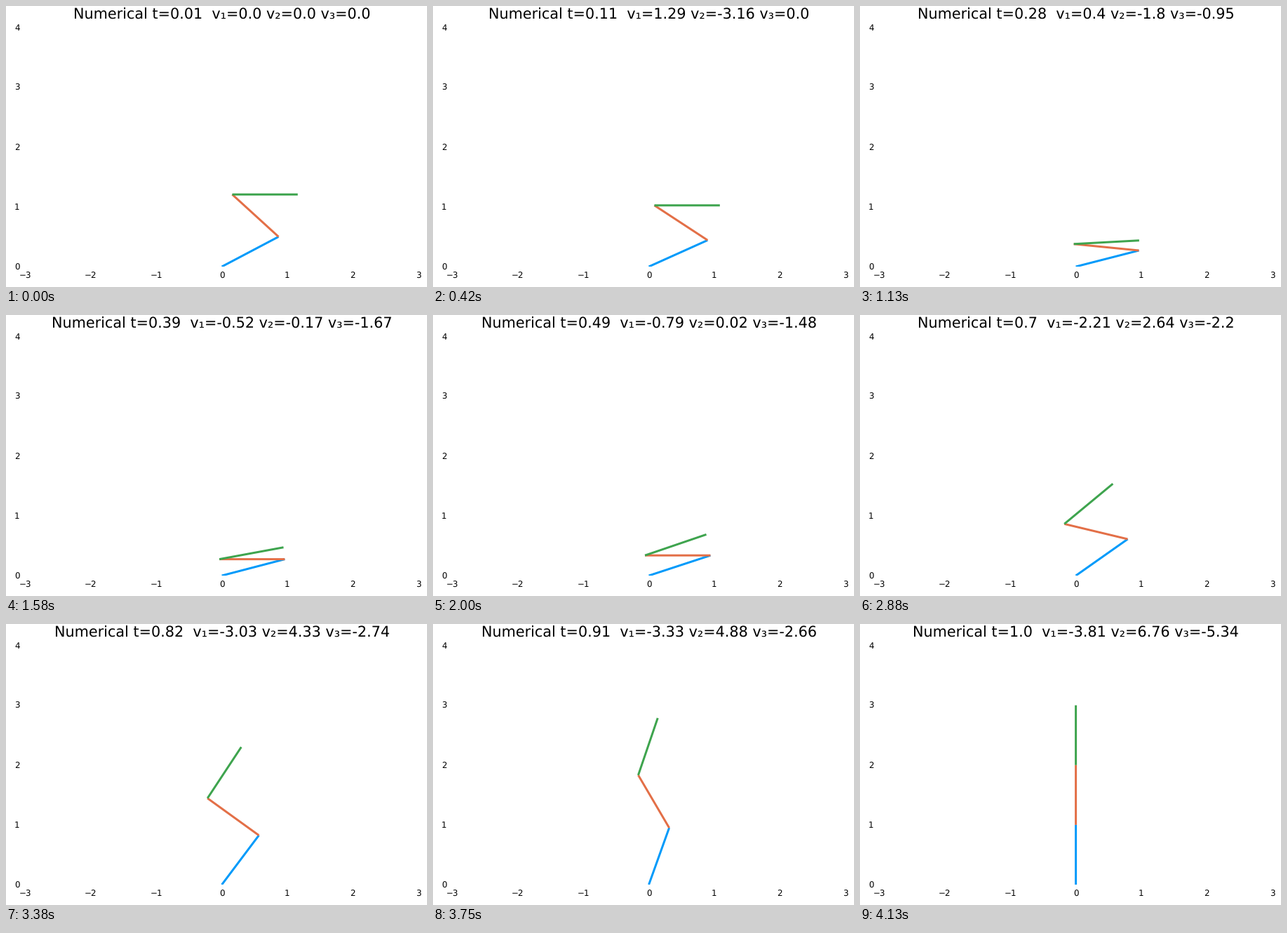
A matplotlib script for the animation above (4180 ms loop, 600 by 400 pixels).

```python
import numpy as np
import matplotlib.pyplot as plt
from matplotlib.animation import FuncAnimation

W, H, DPI = 600, 400, 100
X0, X1, Y0, Y1 = 27.6, 587.6, 371.0, 30.6     # plot area in pixels, y down
COLORS = ["#009afa", "#e36f47", "#3ea44e"]
STEPS = 100

plt.rcParams["font.family"] = "DejaVu Sans"
plt.rcParams["text.hinting"] = "none"

# Each link starts at rest in a crouch (angle from the vertical) and ends upright.
# Acceleration is constant between these key points: time, then speed per link.
START = np.radians([60, -45, 90])
KEYS = np.array([
    (0.01, 0, 0, 0),
    (0.135, 1.61, -3.95, 0),
    (0.4, -0.6, -0.02, -1.735),
    (0.49, -0.79, 0.02, -1.48),
    (0.7, -2.21, 2.64, -2.2),
    (0.82, -3.03, 4.33, -2.74),
    (0.95, -3.46, 5.12, -2.63),
    (1.0, -3.81, 6.76, -5.34),
])

times = np.arange(1, STEPS + 1) / STEPS
speeds = np.array([np.interp(times, KEYS[:, 0], v) for v in KEYS[:, 1:].T])


def swing(start, speed):
    """Integrate the speed, easing out the drift so the link ends upright."""
    moved = np.cumsum((speed[1:] + speed[:-1]) / 2) / STEPS
    angle = start + np.concatenate([[0], moved])
    angle -= angle[-1] * np.linspace(0, 1, STEPS)
    return np.clip(angle, -np.pi / 2, np.pi / 2)


angles = np.array([swing(a, v) for a, v in zip(START, speeds)])
base = np.zeros((1, STEPS))
joint_x = np.vstack([base, np.cumsum(np.sin(angles), axis=0)])
joint_y = np.vstack([base, np.cumsum(np.cos(angles), axis=0)])


def pt(px):
    return px * 72 / DPI


def label(x, baseline, text, size, ha):
    return fig.text(x / W, 1 - baseline / H, text, fontsize=pt(size),
                    ha=ha, va="baseline", color="black")


fig = plt.figure(figsize=(W / DPI, H / DPI), dpi=DPI, facecolor="white")
ax = fig.add_axes([X0 / W, 1 - Y0 / H, (X1 - X0) / W, (Y0 - Y1) / H])
ax.set_xlim(-3, 3)
ax.set_ylim(0, 4)
ax.axis("off")

for v in range(-3, 4):
    x = X0 + (v + 3) * (X1 - X0) / 6
    label(x, 387.4, str(v).replace("-", "\u2212"), 11.9, "center")
for v in range(5):
    label(19.5, Y0 + v * (Y1 - Y0) / 4 + 4.6, str(v), 11.9, "right")

title = label(307.7, 18.5, "", 20.8, "center")
links = [ax.plot([], [], color=c, lw=pt(3), solid_capstyle="butt", snap=False)[0]
         for c in COLORS]


def update(tick):
    # 24 steps per second on a 10 ms clock
    k = min((12 * tick + 5) // 50, STEPS - 1)
    for j, link in enumerate(links):
        link.set_data(joint_x[j:j + 2, k], joint_y[j:j + 2, k])
    v1, v2, v3 = (round(float(v), 2) + 0.0 for v in speeds[:, k])
    title.set_text(f"Numerical t={times[k]}  v₁={v1} v₂={v2} v₃={v3}")
    return [*links, title]


anim = FuncAnimation(fig, update, frames=418, interval=10, repeat=True,
                     repeat_delay=0, blit=False)
plt.show()
```
